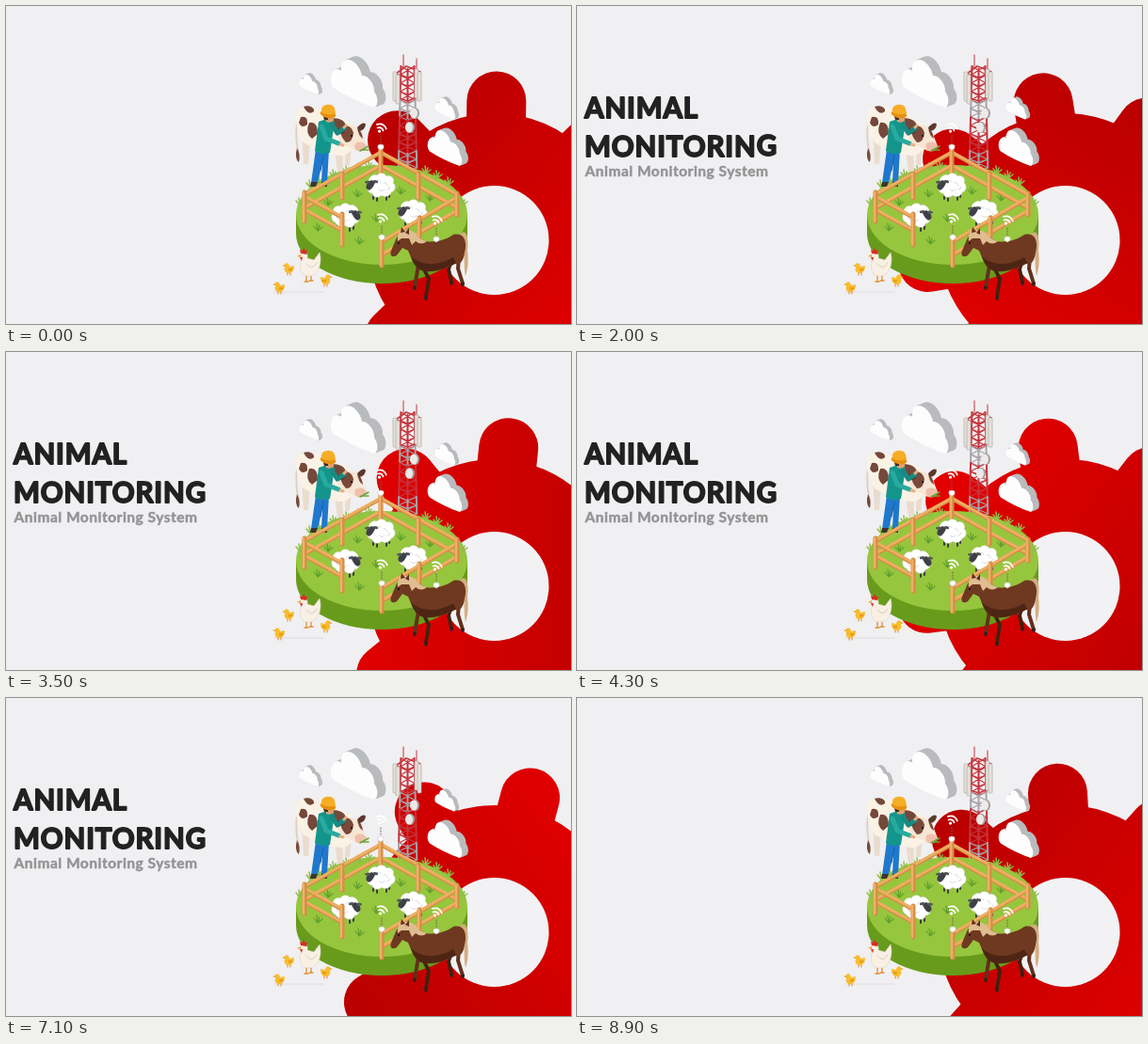
Animation of 600x338 px, one loop 9 s. Source, as an HTML page:

```html
<!DOCTYPE html>
<html lang="en">
<head>
<meta charset="utf-8">
<title>Animal Monitoring</title>
<style>
html, body { margin: 0; width: 100%; height: 100%; overflow: hidden; background: #f0eff1; }
svg { display: block; width: 100vw; height: 100vh; }
text { font-family: Lato, "Open Sans", sans-serif; font-weight: 700; stroke-linejoin: round; }
.title { font-size: 29.5px; fill: #222; stroke: #222; stroke-width: 1.8px; letter-spacing: .9px; }
.sub { font-size: 15.5px; fill: #949395; stroke: #949395; stroke-width: .5px; letter-spacing: .5px; }
.line { fill: none; stroke-linecap: round; stroke-linejoin: round; }
</style>
</head>
<body>
<svg viewBox="0 0 600 338">
  <defs>
    <linearGradient id="red" gradientUnits="userSpaceOnUse" x1="395" y1="140" x2="640" y2="350">
      <stop stop-color="#ba0000"/><stop offset="1" stop-color="#e20000"/>
    </linearGradient>
    <path id="cloud" d="M4 37C-1 33 0 18 8 17C10 17 11 18 12 19C11 8 17 5 23 8C29 11 33 18 34 24C40 23 48 33 47 41C52 47 51 57 47 58Q24 50 4 37Z"/>
    <g id="sheep">
      <path class="line" stroke="#3c3c40" stroke-width="2" d="M-7 8V14M-3 10V16M7 8V15M10 6V12"/>
      <path fill="#fff" stroke="#dcdcdc" stroke-width=".6" d="M-11-4C-12-10-6-13-3-11C0-15 6-13 7-10C12-12 16-7 14-3C18 0 16 6 12 7C11 11 5 13 2 10C-2 14-8 12-8 8C-14 8-15 0-11-4Z"/>
      <path class="line" stroke="#d9dadd" stroke-width="1" d="M-3-5q3-2 4 1M4-3q4-1 4 3M-1 4q3 3 6 0M8 4q3 0 3-3"/>
      <path fill="#3e4047" d="M-9-6C-5-8-4-4-6-1C-8 3-11 6-13 4C-16 2-14-2-12-4Z"/>
      <path fill="#55565d" d="M-6-6Q-1-6-2-3Q-5-2-7-4ZM-11-5Q-16-6-16-3Q-13-2-10-3Z"/>
      <path fill="#fff" d="M-12-6Q-10-12-5-8Q-6-4-9-6Z"/>
    </g>
    <g id="chick">
      <path class="line" stroke="#e0852a" d="M-1 4V7M2 4V7"/>
      <path fill="#f8bd2c" d="M-4-5C-1-7 1-4 1-2L6-3C6 3 3 5 0 5C-4 5-5 1-4-1Z"/>
      <path fill="#e99b1d" d="M0 0H5Q3 4 0 2ZM-4-4L-7-3L-4-2Z"/>
    </g>
    <g id="signal">
      <g class="line" stroke="#fff" stroke-width="1.7" transform="rotate(25)">
        <path d="M-5.500-2Q0-7 5.500-2M-3.300 1Q0-2 3.300 1"/>
        <circle cy="3.500" r=".7" fill="#fff"/>
      </g>
      <path class="line" stroke="#775d58" stroke-width="1" stroke-dasharray="1 2" d="M0 8V17"/>
      <path fill="#fff" stroke="#c9c9cc" stroke-width=".6" d="M-3 18L0 17L3 18V21L0 23L-3 21Z"/>
    </g>
  </defs>

  <g id="gear" fill="url(#red)">
    <path id="teeth" class="line" stroke="url(#red)" stroke-width="63"/>
    <circle cx="518.500" cy="249" r="135"/>
  </g>
  <circle cx="518.500" cy="249" r="58" fill="#f2f1f3"/>

  <g id="clouds"></g>
  <g id="tower"></g>

  <!-- platform -->
  <path fill="#689b1c" d="M308 222V242A91 53 0 0 0 490 242V222Z"/>
  <ellipse cx="399" cy="222" rx="91" ry="53" fill="#96c63d"/>
  <path id="tufts" class="line" stroke="#5f9f2c" stroke-width="1.200"/>
  <path id="backTufts" class="line" stroke="#8fbf4a" stroke-width="1.500"/>

  <!-- cow -->
  <g>
    <path class="line" stroke="#e2cdb8" stroke-width="1.800" d="M311 112Q306 134 310 154"/>
    <path fill="#7a4a38" d="M309 151Q313 157 311 166Q306 162 309 151Z"/>
    <path fill="#eadccd" d="M314 132L323 140L321 168H316ZM348 146H357L358 176H352ZM361 146H367L365 169H360Z"/>
    <path fill="#fbf2e6" d="M309 112C314 104 326 106 333 110C346 118 360 117 370 128C379 138 368 159 356 159C339 159 325 150 316 145C309 134 306 119 309 112Z"/>
    <path fill="#74483a" d="M316 107C322 105 328 108 327 112Q321 117 316 107ZM313 118Q321 116 320 126Q314 131 311 124ZM322 124Q331 122 331 136L325 141Q317 135 322 124ZM345 119Q360 119 361 128Q352 135 346 128Z"/>
    <path fill="#f6e6d5" d="M354 131C362 124 374 126 378 136L383 149C380 156 372 155 367 151L356 146Q350 138 354 131Z"/>
    <path fill="#7a4939" d="M356 130C362 125 367 128 369 135Q368 145 361 145Q354 138 356 130ZM373 129Q378 133 379 141Q374 138 373 129Z"/>
    <path fill="#f0bfab" d="M371 146Q379 142 383 149Q381 156 373 154Q369 151 371 146Z"/>
    <path fill="#5c382c" d="M358 131Q351 128 350 135Q356 138 360 134ZM373 129Q380 122 382 126Q381 132 375 133Z"/>
    <circle cx="367" cy="138" r="1"/>
    <path class="line" stroke="#68a83a" stroke-width="1.500" d="M376 154l9-5M377 153l8 0"/>
  </g>

  <!-- farmer -->
  <g>
    <path fill="#1f78cc" d="M329 152H343L341 188H335L336 166L331 188H324Z"/>
    <path class="line" stroke="#1761a7" d="M337 159L334 175"/>
    <path fill="#40342f" d="M324 187H331L329 192H323ZM335 187H341V192H334Z"/>
    <path fill="#14958c" d="M332 123Q342 118 349 123L344 156Q334 159 328 154Z"/>
    <path class="line" stroke="#198981" stroke-width="5" d="M346 126L352 135L359 130"/>
    <path class="line" stroke="#27aaa0" stroke-width="5" d="M335 128L340 141L353 146"/>
    <path class="line" stroke="#e9ae82" stroke-width="3" d="M359 129l2-2M355 147l3 1"/>
    <path fill="#dda074" d="M339 115H348V122Q344 125 340 123Z"/>
    <path fill="#473020" d="M336 114H342V121H338Z"/>
    <ellipse cx="342" cy="115" rx="8.500" ry="4" fill="#e79111" transform="rotate(12 342 115)"/>
    <path fill="#f6ad26" d="M335 113Q334 106 340 105Q347 104 349 109L350 114Q342 117 335 113Z"/>
  </g>

  <g id="backFence"></g>
  <use href="#sheep" x="397" y="191"/>
  <use href="#sheep" transform="translate(362 223) scale(-1 1)"/>
  <use href="#sheep" x="431" y="219"/>
  <g id="frontFence"></g>

  <!-- horse -->
  <g>
    <path fill="#d3ad80" d="M482 243C488 235 492 246 490 260Q492 276 488 287C485 274 489 256 482 243Z"/>
    <path class="line" stroke="#44200f" stroke-width="3.800" d="M443 278L449 290L446 309M474 268L470 280L473 293"/>
    <path class="line" stroke="#62301b" stroke-width="4" d="M438 275L436 287L434 299M481 267L480 279L485 295"/>
    <path class="line" stroke="#2f211c" stroke-width="3.500" d="M446 309v2M473 294v1M434 299v1M485 295v1"/>
    <path fill="#6e3920" d="M422 240C431 239 437 246 446 250C457 252 468 248 475 243C487 240 490 251 487 262C486 271 482 276 477 274C466 280 451 284 441 281C433 278 431 269 427 260L421 257L415 265C410 268 407 265 409 260L415 246Z"/>
    <path fill="#4d2514" d="M430 266C443 278 462 275 475 267L478 273C464 281 450 284 441 281Q433 277 430 266Z"/>
    <path fill="#dfbd91" d="M419 239Q429 236 435 242Q439 248 447 250Q441 255 435 250L431 254L428 247L420 247L416 250Q415 243 419 239Z"/>
    <path fill="#62301b" d="M419 241L420 235L424 240ZM424 241L428 236L428 243Z"/>
    <circle cx="417" cy="252" r=".9"/>
  </g>

  <use href="#signal" x="398" y="130"/>
  <use href="#signal" x="399" y="226"/>
  <use href="#signal" x="457" y="228"/>

  <!-- poultry -->
  <path class="line" stroke="#dedcdf" d="M285 304H337"/>
  <g transform="translate(0 -2)">
    <path class="line" stroke="#df8e31" stroke-width="1.300" d="M319 287V294M324 287V293M317 295h4M322 294h4"/>
    <path fill="#f8f0e5" stroke="#e1d5c6" stroke-width=".6" d="M313 265C317 260 321 265 320 270L327 272L333 264C336 275 332 288 323 289C314 290 311 282 313 274Z"/>
    <path class="line" stroke="#ddccb8" d="M319 276Q325 284 330 275"/>
    <path fill="#d92e24" d="M313 265l-1-4 3 1 1-3 2 3 2 0-1 4ZM312 269l3 0-1 4Z"/>
    <path fill="#efa02c" d="M313 266l-4 2 4 1Z"/>
  </g>
  <use href="#chick" x="300" y="279"/>
  <use href="#chick" x="290" y="299"/>
  <use href="#chick" transform="translate(340 291) scale(-1 1)"/>

  <text class="title" x="8" y="118.500">ANIMAL</text>
  <text class="title" x="8" y="159.500">MONITORING</text>
  <text class="sub" x="8.500" y="181">Animal Monitoring System</text>
</svg>
<script>
const LOOP = 9000, STEP = 100;
const get = id => document.getElementById(id);
const clamp = v => Math.max(0, Math.min(1, v));

const path = (d, stroke, width) =>
  `<path class="line" d="${d}" stroke="${stroke}" stroke-width="${width}"/>`;

// eight round teeth as four crossing strokes
get('teeth').setAttribute('d', [0, 45, 90, 135].map(deg => {
  const a = deg * Math.PI / 180, x = 148 * Math.sin(a), y = 148 * Math.cos(a);
  return `M${518.5 - x} ${249 - y}L${518.5 + x} ${249 + y}`;
}).join(''));

function cloud(x, y, scale) {
  let out = '';
  for (let i = 9; i >= 0; i--) {
    out += `<use href="#cloud" x="${i}" y="${-i * .4}" fill="${i ? '#b9bbbd' : '#fdfdfe'}"/>`;
  }
  return `<g transform="translate(${x} ${y}) scale(${scale})">${out}</g>`;
}
get('clouds').innerHTML = cloud(344, 50, 1) + cloud(311, 70, .42) +
  cloud(455, 95, .44) + cloud(447, 127, .74);

function tower() {
  const half = y => 7 + (y - 60) * .025, mid = 426.5;
  let out = path('M422 52V64M436 56V68', '#c0353a', 1);
  for (let y = 64, i = 0; y < 172; y += 9, i++) {
    const a = half(y), b = half(y + 9), z = y + 9;
    const color = i % 6 < 4 ? '#c5343c' : '#a7a2a8';
    out += path(`M${mid - a} ${y}L${mid + b} ${z}M${mid + a} ${y}L${mid - b} ${z}M${mid - b} ${z}L${mid} ${z + 3}L${mid + b} ${z}`, color, 1.2) +
      path(`M${mid - a} ${y}L${mid - b} ${z}M${mid + a} ${y}L${mid + b} ${z}M${mid} ${y + 3}V${z + 3}`, color, 2);
  }
  out += path('M414 72L425 64L440 70L427 77ZM414 97L427 101L439 95', '#c53b41', 1.8);
  for (const [x, y] of [[411, 70], [414, 73], [434, 67], [437, 70]]) {
    out += `<rect x="${x}" y="${y}" width="4" height="31" rx="1" fill="#e6e1da" stroke="#b2aca7" stroke-width=".7"/>`;
  }
  for (const [x, y] of [[433, 114], [428, 129]]) {
    out += `<ellipse cx="${x + 1.5}" cy="${y}" rx="4.5" ry="6" fill="#a39f9e"/><ellipse cx="${x}" cy="${y}" rx="4" ry="5.5" fill="#ece9e6"/>`;
  }
  return out;
}
get('tower').innerHTML = tower();

const tuft = ([x, y]) => `M${x} ${y}l-4-5M${x} ${y}l-1-8M${x} ${y}l2-6M${x} ${y}l5-4`;
get('tufts').setAttribute('d', [[331, 239], [373, 203], [393, 229], [419, 200], [450, 207],
  [375, 253], [342, 212]].map(tuft).join(''));
get('backTufts').setAttribute('d', [[312, 212], [323, 193], [333, 190], [348, 182], [362, 178],
  [375, 175], [386, 173], [446, 178], [458, 183], [470, 190], [485, 212]].map(tuft).join(''));

const post = (x, top, bottom) => path(`M${x} ${top}V${bottom}`, '#d58c46', 5) +
  path(`M${x - 1} ${top}V${bottom}`, '#eeb069', 2.5);
const rails = (x1, y1, x2, y2) => [0, 14].map(d =>
  path(`M${x1} ${y1 + d + 1}L${x2} ${y2 + d + 1}`, '#d58e45', 4) +
  path(`M${x1} ${y1 + d}L${x2} ${y2 + d}`, '#eeae62', 3)).join('');

get('backFence').innerHTML = rails(398, 155, 317, 200) + rails(398, 155, 479, 200) +
  post(357, 178, 204) + post(438, 178, 204) + post(398, 152, 181);
get('frontFence').innerHTML = rails(317, 202, 357, 224) + rails(479, 203, 399, 250) +
  post(317, 198, 229) + post(357, 221, 254) + post(479, 199, 222) +
  post(439, 225, 250) + post(399, 247, 276);

// split each line into letters for the staggered entrance
const lines = [...document.querySelectorAll('text')].map(el => {
  el.innerHTML = [...el.textContent].map(c => `<tspan>${c}</tspan>`).join('');
  return [...el.children];
});

function drawText(t) {
  lines.forEach((letters, row) => {
    let last = 0;
    letters.forEach((letter, i) => {
      const lag = i / letters.length;
      const enter = clamp((t - 300 - row * 100 - 700 * lag) / 1000);
      const leave = clamp((t - 7500 - 300 * lag) / 700);
      const y = -16 * ((1 - enter) ** 2 + leave ** 2);
      const alpha = Math.min(1, enter * 2) * (1 - leave);
      letter.setAttribute('dy', y - last);
      letter.setAttribute('fill-opacity', alpha);
      letter.setAttribute('stroke-opacity', alpha);
      last = y;
    });
  });
}

function draw() {
  const t = Math.floor(performance.now() % LOOP / STEP) * STEP;
  get('gear').setAttribute('transform', `rotate(${.9 + t / LOOP * 360} 518.5 249)`);
  drawText(t);
  requestAnimationFrame(draw);
}
draw();
</script>
</body>
</html>
```
